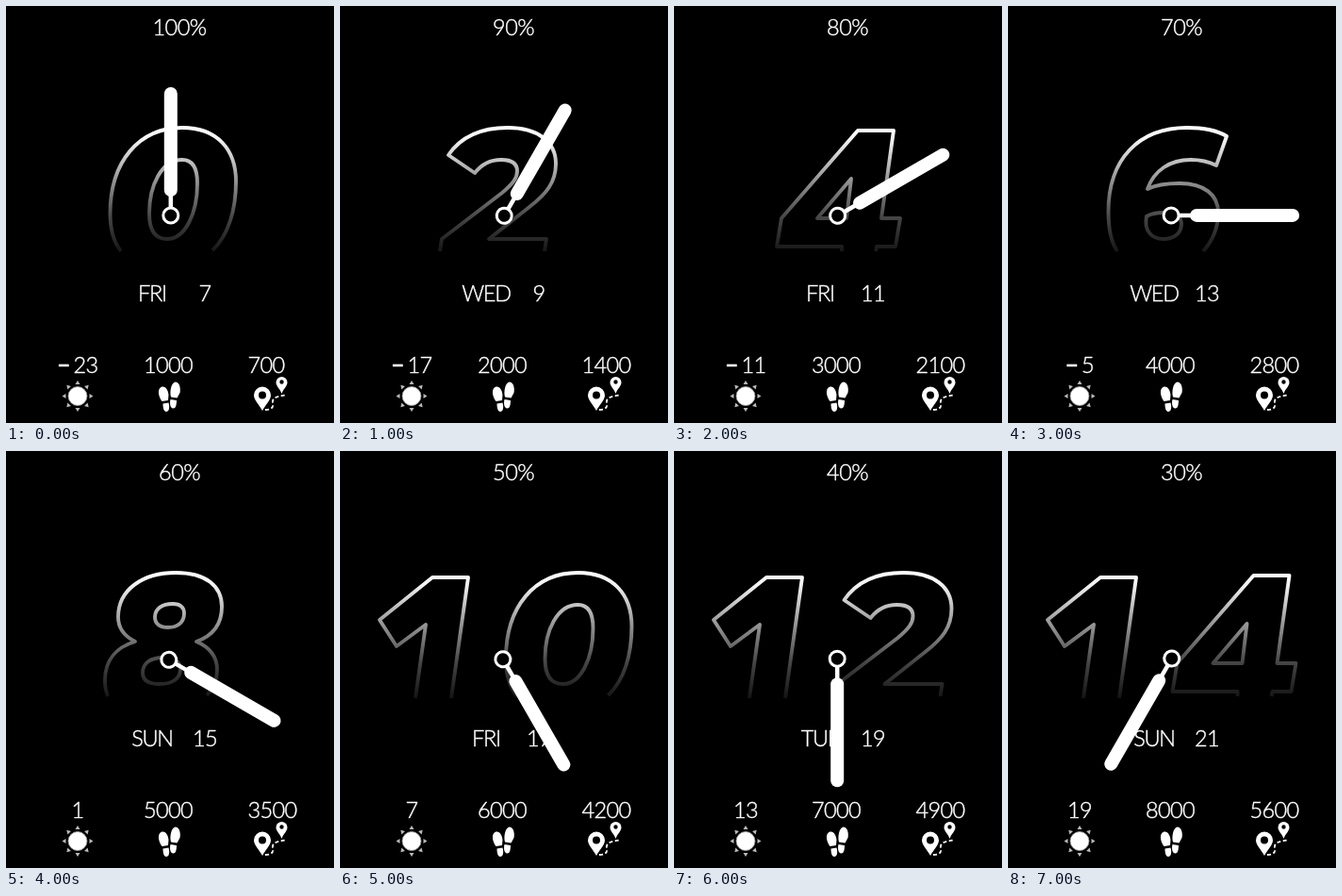
Write an HTML page that moves like this. It is 348 by 442 pixels and loops after 8000 ms.

```html
<!DOCTYPE html>
<html lang="en">
<head>
<meta charset="utf-8">
<title>Watch face</title>
<style>
  html, body { margin: 0; width: 100%; height: 100%; overflow: hidden; background: #000; }
  svg { display: block; width: 348px; height: 442px; }
  text {
    font: 300 23.5px Lato, "Open Sans", sans-serif; letter-spacing: -.6px; text-anchor: middle;
    fill: #fff; stroke: #fff; stroke-width: .45px;
  }
  #weekday { letter-spacing: -1.3px; }
  #distance { text-anchor: start; }
  .minus { font-weight: 700; }
</style>
</head>
<body>
<svg viewBox="0 0 348 442">
  <defs>
    <linearGradient id="fade" gradientUnits="userSpaceOnUse" x1="0" y1="130" x2="0" y2="262">
      <stop offset="0" stop-color="#fff"/>
      <stop offset=".1" stop-color="#f0f0f0"/>
      <stop offset=".4" stop-color="#989898"/>
      <stop offset=".72" stop-color="#444"/>
      <stop offset="1" stop-color="#141414"/>
    </linearGradient>
  </defs>

  <g fill="none" stroke="url(#fade)" stroke-width="3.9" stroke-linejoin="round">
    <path id="tens" d="M80 262L91 184L60 207L42 179L98 134H136L118 262"/>
    <path id="units"/>
  </g>

  <text id="battery" x="184" y="31"/>
  <text id="weekday" x="155" y="313"/>
  <text id="day" x="211" y="313"/>
  <text id="temperature" x="76" y="389"/>
  <text id="steps" x="172" y="389"/>
  <text id="distance" x="256.500" y="389"/>

  <g fill="#fff">
    <g transform="translate(76 413.5)">
      <circle r="10" stroke="#999" stroke-width=".8"/>
      <g id="rays" fill="#bbb"/>
    </g>
    <path d="M164.500 404C169 402 172 407 172.500 412L172 418L165.500 419C161.500 414 160.500 406 164.500 404ZM166.500 421.500L172.500 420.500C174 426 173 430 170 430C167.500 430 166.500 426 166.500 421.500Z"/>
    <path d="M180 398.500C184.500 399 185.500 406 184.500 410L181.500 415.500L175 414.500C173.500 409 175 399 180 398.500ZM174.500 417L181 418C181 423 180 426.500 177.500 426.500C174 426.500 173.500 421 174.500 417Z"/>
    <path fill-rule="evenodd" d="M272 429C269 423 263 418 263 412.500A9 9 0 0 1 281 412.500C281 418 275 423 272 429ZM276 412.500A4 4 0 1 0 268 412.500A4 4 0 1 0 276 412.500Z"/>
    <path fill-rule="evenodd" d="M292.500 411C291 406 286.500 403 286.500 399A6 6 0 0 1 298.500 399C298.500 403 294 406 292.500 411ZM294.700 398.500A2.200 2.200 0 1 0 290.300 398.500A2.200 2.200 0 1 0 294.700 398.500Z"/>
    <path d="M275 428C282 428 284 425 283 421C282 415 287 414 297 412.500" fill="none" stroke="#fff" stroke-width="1.8" stroke-dasharray="4 2.500"/>
  </g>

  <g id="hand" stroke="#fff" stroke-linecap="round">
    <path d="M174.800 214V196" stroke-width="4.500"/>
    <path d="M174.800 195V93" stroke-width="14"/>
    <circle cx="174.800" cy="222" r="8" stroke-width="3"/>
  </g>
</svg>
<script>
const $ = id => document.getElementById(id);

const digits = {
  0: 'M122 260C114 250 110.500 238 110.500 220C110.500 165 141 129 187 129C224 129 244 152 244 186C244 216 236 243 219 259' +
     'M187 163C198 163 203 172 203 188C203 220 190 247 171 247C158 247 152 238 152 220C152 190 165 163 187 163Z',
  2: 'M106 260L108 247L172 198C184 188 188 182 188 175C188 167 182 163 171 163C160 163 150 168 143 177' +
     'L115 158C128 139 148 129 178 129C210 129 229 144 229 167C229 187 219 199 201 213L158 247H219L217 260',
  4: 'M178 260V255H109L114 225L195 132H233L220 225H240L235 255H215L214 260M188 183L152 225H183Z',
  6: 'M116 260C109 250 106.500 237 106.500 218C106.500 162 139 129 190 129C208 129 222 132 232 138L221 169' +
     'C213 165 204 163 194 163C172 163 155 174 148 194C158 189 172 188 182 188C208 188 223 200 223 219C223 237 216 250 207 260' +
     'M147 223C152 220 160 219 166 219C178 219 184 224 184 231C184 241 176 247 165 247C152 247 144 238 147 223Z',
  8: 'M108 260C106 255 105 250 105 243C105 222 117 208 137 202C125 196 119 188 119 176C119 147 145 129 180 129' +
     'C212 129 229 143 229 165C229 184 219 196 202 202C216 208 224 217 224 232C224 243 220 252 213 259' +
     'M177 162C185 162 189 166 189 172C189 181 183 187 172 187C163 187 158 183 158 176C158 167 166 162 177 162Z' +
     'M167 219C179 219 185 224 185 231C185 241 177 247 163 247C151 247 145 243 145 235C145 225 153 219 167 219Z'
};
const weekdays = ['SUN', 'MON', 'TUE', 'WED', 'THU', 'FRI', 'SAT'];

for (let a = 0; a < 360; a += 45)
  $('rays').innerHTML += `<path d="M-2.500 -12.500L0 -16.500L2.500 -12.500Z" transform="rotate(${a})"/>`;

// Each step moves two hours, one month and two days ahead.
function show(step) {
  const hour = step * 2;
  const day = 7 + step * 2;
  const temperature = step * 6 - 23;
  const twoDigits = hour > 9;

  $('tens').style.display = twoDigits ? '' : 'none';
  $('units').setAttribute('d', digits[hour % 10]);
  $('units').setAttribute('transform', `translate(${twoDigits ? 65.5 : 0})`);
  $('hand').setAttribute('transform', `rotate(${hour * 15} 174 221.1)`);

  $('battery').textContent = 100 - step * 10 + '%';
  $('weekday').textContent = weekdays[new Date(2022, step, day).getDay()];
  $('day').textContent = day;
  $('temperature').innerHTML =
    (temperature < 0 ? '<tspan class="minus">−</tspan><tspan dx="4">' : '<tspan>') + Math.abs(temperature) + '</tspan>';
  $('steps').textContent = 1000 * (step + 1);
  $('distance').textContent = 700 * (step + 1);
}

let start, shown;
function tick(now) {
  start ??= now;
  const step = Math.floor((now - start) / 1000) % 8;
  if (step !== shown) show(shown = step);
  requestAnimationFrame(tick);
}
show(shown = 0);
requestAnimationFrame(tick);
</script>
</body>
</html>
```
